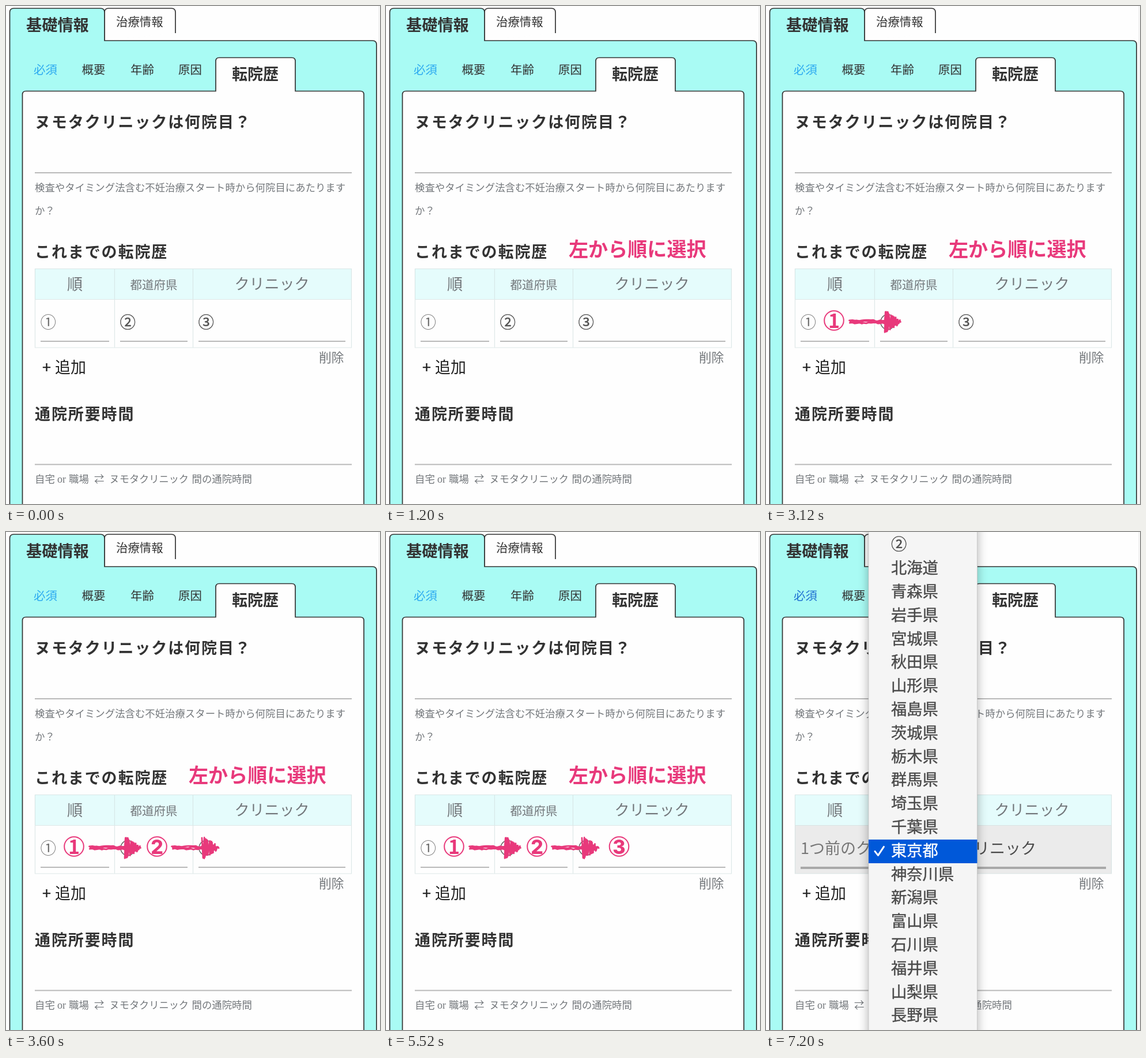
Animation of 649 by 863 pixels, one loop 8000 ms. Source, as an HTML page:

```html
<!DOCTYPE html>
<html lang="ja">
<head>
<meta charset="utf-8">
<title>転院歴</title>
<style>
html, body { margin: 0; width: 100%; height: 100%; overflow: hidden; background: #fefefe; }
svg { display: block; width: 100%; height: 100%; }
text { font-family: "Noto Sans CJK JP", "Noto Sans CJK", sans-serif; white-space: pre; }
</style>
</head>
<body>
<svg id="stage" viewBox="0 0 649 863" xmlns="http://www.w3.org/2000/svg"></svg>
<script>
const NS = 'http://www.w3.org/2000/svg';
const stage = document.getElementById('stage');
const INK = '#333', GRAY = '#73777b', PINK = '#e8397b', CYAN = '#a9fbf4', PAPER = '#fefefe';
const MENU = '#f5f5f5', MENU_INK = '#4b4b4b', PICK = '#0058d9';
const CLINIC = 'ヌモタクリニック';

function add(parent, tag, attrs, content) {
  const el = document.createElementNS(NS, tag);
  for (const key in attrs) el.setAttribute(key, attrs[key]);
  if (content) el.textContent = content;
  parent.appendChild(el);
  return el;
}
const group = (parent = stage) => add(parent, 'g', {});
const rect = (p, x, y, width, height, fill, more) =>
  add(p, 'rect', { x, y, width, height, fill, ...more });
const rule = (p, x1, x2, y, color = '#b9b9b9', w = 2) => rect(p, x1, y - w / 2, x2 - x1, w, color);
const path = (p, d, more) =>
  add(p, 'path', { d, fill: 'none', stroke: INK, 'stroke-width': 1.7, ...more });

// Text placed by the vertical middle of its em box.
const text = (p, str, x, cy, size, fill = INK, more) =>
  add(p, 'text', { x, y: cy + size * 0.38, 'font-size': size, fill, ...more }, str);
const bold = { 'font-weight': 700 };
const mid = { 'text-anchor': 'middle' };
const thicken = color => ({ stroke: color, 'stroke-width': 0.4 });

// Box with rounded top corners, open at the bottom.
const openBox = (l, t, r, b, q, end = b) =>
  `M${l} ${b}V${t + q}Q${l} ${t} ${l + q} ${t}H${r - q}Q${r} ${t} ${r} ${t + q}V${end}`;

function random(seed) {
  return () => (seed = (seed * 16807) % 2147483647) / 2147483647;
}

const defs = add(stage, 'defs', {});
const blur = add(defs, 'filter', { id: 'soft', x: '-30%', y: '-20%', width: '160%', height: '140%' });
add(blur, 'feGaussianBlur', { stdDeviation: 9 });

// Panels and tabs
const page = group();
rect(page, 0, 0, 649, 863, PAPER);
rect(page, 646.5, 0, 1.5, 863, '#ececec');
path(page, openBox(171, 4, 294, 60, 7, 47), { fill: PAPER });
path(page, openBox(6.5, 4, 171, 870, 7, 60) + 'H636Q643 60 643 67V870', { fill: CYAN });
path(page, openBox(28.5, 147.5, 621, 870, 6), { fill: PAPER });
path(page, openBox(364, 89.5, 502, 148, 6), { fill: PAPER });
rect(page, 364.9, 145, 136.2, 6, PAPER);

text(page, '基礎情報', 35, 33, 27.2, INK, bold);
text(page, '治療情報', 191, 27, 20.4);
const must = text(page, '必須', 48, 110, 20.4);
text(page, '概要', 131.5, 110, 20.4);
text(page, '年齢', 216, 110, 20.4);
text(page, '原因', 299, 110, 20.4);
text(page, '転院歴', 392, 118, 27, INK, bold);

// Form
const heading = { ...bold, 'letter-spacing': 1.9 };
text(page, CLINIC + 'は何院目？', 50, 201, 27, INK, heading);
rule(page, 50, 600, 289);
text(page, '検査やタイミング法含む不妊治療スタート時から何院目にあたります', 50, 314, 17.4, GRAY);
text(page, 'か？', 50, 354, 17.4, GRAY);
text(page, 'これまでの転院歴', 50, 426, 27, INK, heading);
text(page, '+', 63, 625.5, 27, '#222', thicken('#222'));
text(page, '追加', 85, 625.5, 27, '#222');
text(page, '削除', 543, 609, 21.7, GRAY);
text(page, '通院所要時間', 50, 707, 27, INK, heading);
rule(page, 50, 600, 794.5);
text(page, '自宅', 50, 819.5, 17.4, GRAY);
add(page, 'text', {
  x: 89, y: 826, 'font-size': 18, fill: GRAY, style: 'font-family:"Liberation Serif",serif'
}, 'or');
text(page, '職場', 109, 819.5, 17.4, GRAY);
text(page, '⇄', 153, 819.5, 17.4, GRAY);
text(page, CLINIC, 179.5, 819.5, 17.2, GRAY);
text(page, '間の通院時間', 322.5, 819.5, 17.4, GRAY);

// Table
rect(page, 50, 455, 549.5, 53, '#e5fcfc');
text(page, '順', 119.5, 481.5, 27, GRAY, mid);
text(page, '都道府県', 256.5, 483.5, 20.5, GRAY, mid);
text(page, 'クリニック', 461.5, 481, 26, GRAY, mid);
const pale = group(), dark = group();
[[60, 179], [198, 315], [334, 589]].forEach(([a, b], i) => {
  const color = i ? '#4f4f4f' : '#707070';
  text(pale, '①②③'[i], a - 0.5, 548, 27.5, color, i ? thicken(color) : {});
  rule(pale, a, b, 581);
});
rect(dark, 50, 508, 549.5, 84, '#ebebeb');
rule(dark, 60, 590, 582, '#a9a9a9', 4);
const filled = group(dark);
text(filled, '1つ前のクリニック', 60, 548, 27, '#777');
text(filled, 'クリニック', 334, 548, 27, '#4a4a4a');
path(stage, 'M50.5 455.5H599.5V592H50.5ZM50.5 508.5H599.5M188.5 455.5V592M324.5 455.5V592',
  { stroke: '#d3e0e0', 'stroke-opacity': 0.75, 'stroke-width': 1.2 });

// Pink notes
const notes = [1, 2, 3, 4].map(() => group());
text(notes[0], '左から順に選択', 317, 421, 34.1, PINK, bold);

function badge(p, n, x) {
  add(p, 'circle', { cx: x, cy: 545, r: 16.8, fill: 'none', stroke: PINK, 'stroke-width': 2 });
  const face = n === 1 ? '"Noto Sans CJK JP",sans-serif' : 'Inter,sans-serif';
  add(p, 'text', {
    x, y: 557.5, 'font-size': 34, 'font-weight': n === 1 ? 900 : 800, fill: PINK,
    style: 'font-family:' + face, ...mid
  }, n);
}

// Crayon arrow: wobbling passes for the shaft, hatching for the head.
function arrow(p, from, tip) {
  const rnd = random(71);
  const jit = a => (rnd() * 2 - 1) * a;
  const neck = tip - 29;
  let d = '';
  for (let k = -1; k < 2; k++) {
    d += `M${from + jit(1.5)} ${547 + k * 2.2}`;
    for (let x = from + 4; x <= neck + 4; x += 4) d += `L${x} ${547 + k * 2.2 + jit(1.3)}`;
  }
  const h = x => (tip - x) * 0.63;
  d += `M${neck} 547`;
  for (let x = neck; x < tip - 1; x += 1.6) {
    d += `L${x + jit(1.6)} ${547 - h(x) + jit(1.8)}L${x + jit(1.6)} ${547 + h(x) + jit(1.8)}`;
  }
  d += `L${tip - 1.5} 547.5`;
  path(p, d, { stroke: PINK, 'stroke-width': 2.7, 'stroke-linejoin': 'round', 'stroke-linecap': 'round' });
}
badge(notes[1], 1, 118);
arrow(notes[1], 146, 235);
badge(notes[2], 2, 262);
arrow(notes[2], 289, 370);
badge(notes[3], 3, 404.5);

// Drop-down menus
function menu({ x, y, w, q, first, items, picked, checked }) {
  const g = group(), pitch = 40.8;
  const box = { rx: q };
  rect(g, x, y + 6, w, 900, '#000', { ...box, opacity: 0.32, filter: 'url(#soft)' });
  rect(g, x, y, w, 900, MENU, { ...box, stroke: '#c4c4c4', 'stroke-width': 0.8 });
  rect(g, x, Math.round(first + picked * pitch - 18), w, 41, PICK);
  items.forEach((item, i) => {
    const cy = first + i * pitch, color = i === picked ? '#fff' : MENU_INK;
    text(g, item, x + 39, cy, 27.3, color, thicken(color));
    if (i === checked) {
      path(g, `M${x + 11} ${cy + 2}l5.5 7l10 -15`,
        { stroke: i === picked ? '#fff' : '#333', 'stroke-width': 3, 'stroke-linecap': 'round', 'stroke-linejoin': 'round' });
    }
  });
  return g;
}
const orderMenu = menu({
  x: 38.5, y: 526, w: 330, q: 8, first: 551, picked: 1, checked: 0,
  items: ['①', ...Array.from({ length: 7 }, (_, i) => i + 1 + 'つ前のクリニック')]
});
const areaMenu = menu({
  x: 178, y: -20, w: 188.5, q: 0, first: 21, picked: 13, checked: 13,
  items: ('② 北海道 青森県 岩手県 宮城県 秋田県 山形県 福島県 茨城県 栃木県 群馬県 埼玉県 ' +
    '千葉県 東京都 神奈川県 新潟県 富山県 石川県 福井県 山梨県 長野県').split(' ')
});

const LOOP = 8000, STEP = 1200;
const show = (el, on) => el.setAttribute('display', on ? 'inline' : 'none');

function draw(ms) {
  const step = Math.floor((ms % LOOP) / STEP);
  notes.forEach((note, i) => show(note, step > i && step < 5));
  show(pale, step < 5);
  show(dark, step >= 5);
  show(filled, step === 6);
  show(orderMenu, step === 5);
  show(areaMenu, step === 6);
  must.setAttribute('fill', step === 6 ? '#1f70d2' : step === 5 ? '#40a2ee' : '#2caaf0');
}

let start;
function tick(now) {
  start ??= now;
  draw(now - start);
  requestAnimationFrame(tick);
}
draw(0);
requestAnimationFrame(tick);
</script>
</body>
</html>
```
